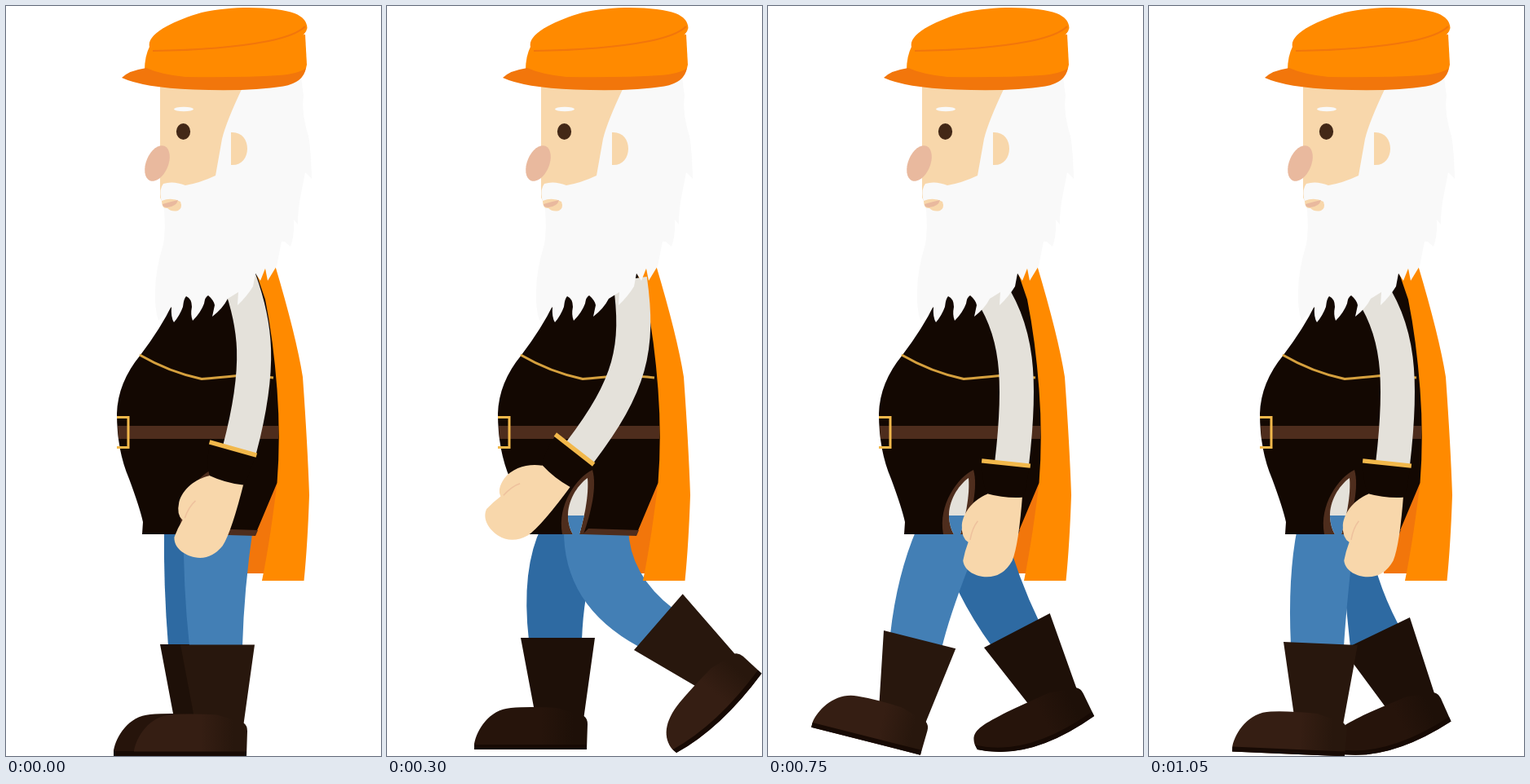
Animation of 460 by 920 pixels, one loop 1200 ms. Source, as an HTML page with a canvas:

```html
<!DOCTYPE html>
<html lang="en">
<head>
<meta charset="utf-8">
<title>Walking man</title>
<style>
  html, body { margin: 0; width: 100%; height: 100%; overflow: hidden; background: #fff; }
  canvas { display: block; width: 460px; height: 920px; }
</style>
</head>
<body>
<canvas id="stage" width="460" height="920"></canvas>
<script>
const ctx = document.getElementById('stage').getContext('2d');
const STEP = 150;

const C = {
  orange: '#ff8a00', deepOrange: '#f2760b', skin: '#f8d7ab', nose: '#e9b99e',
  hair: '#f9f9f9', vest: '#130802', belt: '#4e2d1d', gold: '#f2b84b',
  sleeve: '#e4e1da', near: '#437fb5', far: '#2e6aa2', eye: '#432817'
};
const BOOT = {
  near: { shaft: '#28170d', foot: '#351e13', sole: '#170a04' },
  far: { shaft: '#1e1008', foot: '#26140b', sole: '#170a04' }
};

// Arm: sleeve centre line, then cuff position and tilt in degrees.
const ARMS = {
  rest: { line: 'M286 335C306 390 314 440 286.500 544', cuff: [278.5, 543, 15.7] },
  front: { line: 'M291 335C302 400 298 460 247 556', cuff: [239, 552, 28.3] },
  reach: { line: 'M298 335C310 420 299 465 237 547', cuff: [230, 544, 38] },
  low: { line: 'M286 335C296 410 289 450 258 557', cuff: [250, 555.5, 18.7] },
  back: { line: 'M266 340C308 395 311 460 299 562', cuff: [292, 561, 6] }
};

// Leg: trouser outline; boot x, y, tilt in degrees, toe bend 0..1.
const POSES = [
  { arm: 'rest',
    far: { leg: 'M194 640Q193 710 199 785H265L275 640Z', boot: [189, 783, 0, 0] },
    near: { leg: 'M218 640Q217 710 225 785H290Q292 715 303 640Z', boot: [214, 783.5, 0, 0] } },
  { arm: 'front',
    far: { leg: 'M184 640Q152 695 121 770L179 799Q195 765 224 722L250 640Z', boot: [112, 761, 26.5, 0] },
    near: { leg: 'M205 640Q205 715 271 792L327 758Q284 695 283 640Z', boot: [263, 793, -31.4, 1] } },
  { arm: 'reach',
    far: { leg: 'M190 638Q164 690 174 778H239Q240 750 244 725L260 640Z', boot: [164, 775, 0, 0] },
    near: { leg: 'M217 640Q215 735 309 786L352 740Q297 698 296 640Z', boot: [303, 790, -49, .5] } },
  { arm: 'front',
    far: { leg: 'M187 640Q171 700 178 784L242 786Q244 740 260 640Z', boot: [169, 779, 2, 0] },
    near: { leg: 'M214 640Q214 720 253 787L314 758Q286 695 283 640Z', boot: [244, 789, -26, 1] } },
  { arm: 'low',
    far: { leg: 'M230 640L262 784L321 755Q290 692 281 640Z', boot: [254, 788, -27.5, .7] },
    near: { leg: 'M199 640Q199 720 205 785H270Q271 725 281 640Z', boot: [195, 783, 0, 0] } },
  { arm: 'back',
    far: { leg: 'M230 640L233 717Q252 755 275 786L333 756Q306 700 290 640Z', boot: [265, 787, -27.5, 1] },
    near: { leg: 'M183 640Q158 698 150 771L213 788Q222 750 246 688L262 640Z', boot: [142, 766, 14.2, 0] } },
  { arm: 'back',
    far: { leg: 'M225 640Q222 725 288 781L330 736Q292 700 288 640Z', boot: [281, 785, -45, .6] },
    near: { leg: 'M182 640Q162 700 160 776L224 784Q231 740 252 640Z', boot: [151, 773, 7, 0] } },
  { arm: 'back',
    far: { leg: 'M232 640L247 787L306 759Q275 700 268 640Z', boot: [238, 789.5, -25.8, .9] },
    near: { leg: 'M182 640Q170 700 174 784L239 786Q242 735 253 640Z', boot: [165, 780, 2.5, 0] } }
];

function fill(path, color) {
  ctx.fillStyle = color;
  ctx.fill(new Path2D(path));
}

function line(path, color, width) {
  ctx.strokeStyle = color;
  ctx.lineWidth = width;
  ctx.stroke(new Path2D(path));
}

function oval(x, y, rx, ry, tilt, color) {
  ctx.fillStyle = color;
  ctx.beginPath();
  ctx.ellipse(x, y, rx, ry, tilt, 0, Math.PI * 2);
  ctx.fill();
}

function placed(x, y, degrees, draw) {
  ctx.save();
  ctx.translate(x, y);
  ctx.rotate(degrees * Math.PI / 180);
  draw();
  ctx.restore();
}

function drawBoot([x, y, tilt, bend], tone) {
  placed(x, y, tilt, () => {
    const tx = -57 - 8 * bend, ty = 137 - 30 * bend;
    const mx = 10 - 25 * bend, my = 137 + 13 * bend;
    const grad = ctx.createLinearGradient(25, 0, 65, 0);
    grad.addColorStop(0, tone.foot);
    grad.addColorStop(1, tone.shaft);
    fill('M0 0H91L77.500 97L50 125L19 110L16 85Z', tone.shaft);
    const top = `M${tx} ${ty}V${ty - 7}C${tx + 3} ${ty - 24} ${tx + 18} ${88 - 5 * bend} -12 ${86 - 3 * bend}`;
    fill(`${top}Q10 84 45 86L77.500 96Q82 99 82 106L81 137Q${mx} ${my} ${tx} ${ty}Z`, grad);
    fill(`M${tx} ${ty}V${ty - 6}Q${mx} ${my - 6} 81 131V137Q${mx} ${my} ${tx} ${ty}Z`, tone.sole);
  });
}

function drawLeg(limb, side) {
  fill(limb.leg, C[side]);
  drawBoot(limb.boot, BOOT[side]);
}

function drawVest() {
  fill('M204 366Q190 395 165 428Q137 462 136 500Q136 545 151 580Q164 615 168 633L167 648H306L332.500 585Q337 530 332.500 470Q328 410 318 360L306 325H220Z', C.vest);
  line('M164 428Q200 449 240 457.500Q258 456 284 453.500Q312 454 328 456', '#d5a03e', 3);
  fill('M137 515H334V531H138Z', C.belt);
  line('M136 504.500H150V541.500H136', C.gold, 3);
  fill('M247 641L309 643L306 650L240 648Z', C.belt);
  fill('M252 569C233 578 208 612 215 648H241C250 622 258 590 252 569Z', C.belt);
  const slit = 'M246 579C233 588 221 608 222 627Q223 640 228 648H236C241 630 248 602 246 579Z';
  fill(slit, C.sleeve);
  ctx.save();
  ctx.clip(new Path2D(slit));
  fill('M210 625H260V650H210Z', C.near);
  ctx.restore();
}

function drawArm(arm) {
  line(arm.line, C.sleeve, 42);
  placed(...arm.cuff, () => {
    fill('M-19 34V40C-34 48 -46 64 -46 81Q-45 97 -36 101Q-39 112 -40 124C-37 137 -22 142 -9 141Q11 139 20 118Q26 98 24 34Z', C.skin);
    line('M-27 74Q-33 83 -34 98', '#eec19d', 1.5);
    fill('M-29 0H29L27 28Q27 36 24 39.500Q2 43 -19 39.500Q-28 25 -29 0Z', C.vest);
    line('M-30 0H30', C.gold, 5.5);
  });
}

function drawHead() {
  fill('M189 92H300V215L230 245H194L189 235Z', C.skin);
  fill('M291 98Q270 142 265 163L257 208Q238 217 220 220Q205 214 193 218Q188 224 190 236L194 250Q196 275 193 292Q183 325 183 350Q182 370 187 386L203 369Q202 382 206 388Q213 380 217 369Q218 359 221 356Q228 359 228 369Q226 379 229 386Q239 376 243 365Q244 357 248 355Q255 361 256 367L253 381Q266 371 272 359L285 351L284 367Q295 357 303 344L306 328L312 337L318 322L321 337L332 319L338 289Q342 288 344 291L349 295Q354 282 353 262L358 268Q358 250 361 235L367 204L375 212Q374 175 371 160Q362 130 365 110L362 88H298Z', C.hair);
  fill('M276 155C289 154 296 164 296 175C296 186 289 196 276 195Z', C.skin);
  oval(218, 126.5, 12, 2.8, 0, C.hair);
  oval(217.5, 154, 8.6, 10, 0, C.eye);
  oval(185.5, 193, 13.5, 23, .4, C.nose);
  fill('M191 239Q203 234 214 240Q217 248 211 251Q203 253 198 248Q191 249 191 239Z', C.skin);
  fill('M192 243Q202 240 211 238Q209 246 198 247Q192 247 192 243Z', C.nose);
}

function drawHat() {
  fill('M176 50Q170 62 170 79L240 96H345Q366 90 369 72L367 35Z', C.orange);
  fill('M176 50C172 34 208 17 240 8C285 -2 335 2 354 9Q369 15 369.500 27Q368 36 355 41Q290 54 176 55Z', C.orange);
  line('M180 55Q265 54 322 43Q356 36 367 25', C.deepOrange, 2);
  fill('M142 88Q151 79 172 76Q190 84 220 87Q290 88 335 85Q360 83 368 76Q365 94 340 98.500Q300 105 230 102.500Q168 100 142 88Z', C.deepOrange);
}

function drawPose(pose) {
  ctx.fillStyle = '#fff';
  ctx.fillRect(0, 0, 460, 920);
  fill('M333 575L340 696H288V640Z', C.deepOrange);
  drawLeg(pose.far, 'far');
  drawLeg(pose.near, 'near');
  fill('M333 580Q325 650 314 705H365.500Q370 660 372 600Q370 540 364 455Q356 405 330 318L305 322Z', C.orange);
  drawVest();
  drawArm(ARMS[pose.arm]);
  drawHead();
  drawHat();
}

const start = performance.now();
function tick() {
  const t = Math.max(0, performance.now() - start);
  drawPose(POSES[Math.floor(t / STEP) % POSES.length]);
  requestAnimationFrame(tick);
}
tick();
</script>
</body>
</html>
```
